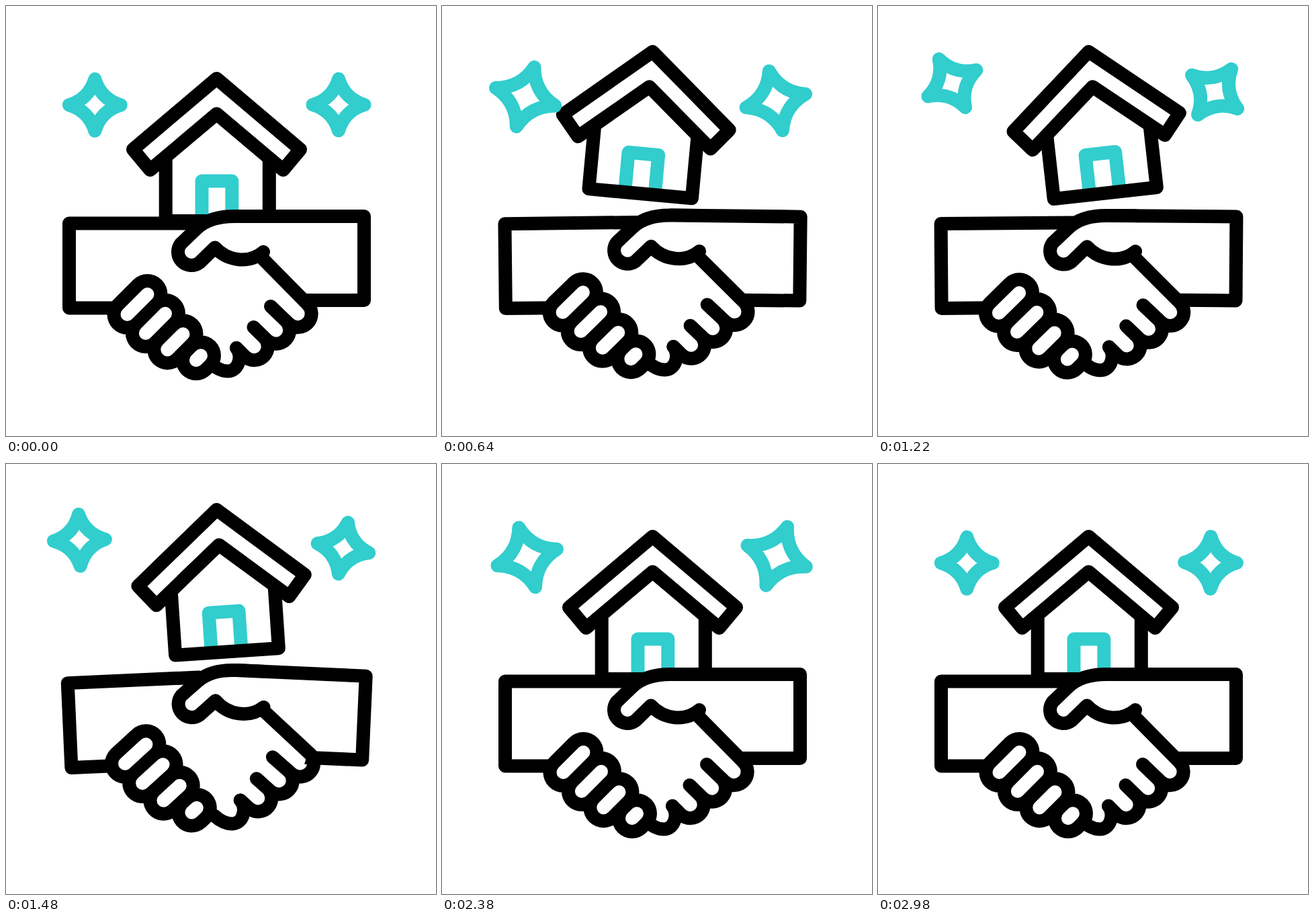
Recreate the animation shown at these times as an HTML page. Size 640x640 px, loop 3.56 s.

```html
<!DOCTYPE html>
<html lang="en">
<head>
<meta charset="utf-8">
<title>Home deal</title>
<style>
  html, body { margin: 0; width: 100%; height: 100%; overflow: hidden; background: #fff; }
  svg { display: block; width: 100%; height: 100%; }
  .ink, .teal { fill: none; stroke: #000; stroke-width: 20; stroke-linecap: round; stroke-linejoin: round; }
  .teal { stroke: #32cdcd; }
  .paper { fill: #fff; }
  .outer { stroke-width: 60; }
  .inner { stroke: #fff; }
</style>
</head>
<body>
<svg viewBox="0 0 640 640">
  <g class="house">
    <path class="paper" d="M238 225L313.5 160L392 225V320H238Z"/>
    <path class="teal" d="M291.5 320V260.5H336.3V320"/>
    <path class="ink" d="M237.7 225V320H391.8V225"/>
    <path class="ink paper" d="M313.5 108L438 213.5L412.5 244L313.5 160.5L214.5 244L189 213.5Z"/>
  </g>

  <g class="right">
    <path class="paper" d="M340 313H533V438H415L383 366Z"/>
    <path class="ink" d="M340 313H533V438H420"/>
  </g>

  <g class="left">
    <path class="paper" d="M94 323.5H290L382 376L447 442L434 478L369 527L330 543L300 535L165 449H94Z"/>
    <path class="ink" d="M290 323.5H94V449.5H172"/>
    <path class="ink knuckles"/>
    <path class="ink" d="M343 509C352 520 347 543.5 330 543.5C320 543.5 312 539 303 530"/>
  </g>

  <g class="right">
    <path class="paper ink thumb" d="M383 313H340C318 313 299 317 284 331L260 354A20 20 0 0 0 288 382L311 359.5C330 380 362 384 383 366"/>
    <path class="ink outer fingers"/>
    <path class="ink inner fingers"/>
  </g>

  <path class="teal star"/>
  <path class="teal star"/>
</svg>
<script>
const LOOP = 3560;
const all = selector => [...document.querySelectorAll(selector)];
const list = (n, make) => Array.from({ length: n }, (_, i) => make(i)).join('');
const set = (selector, name, value) => all(selector).forEach(el => el.setAttribute(name, value));

// Four fingers of the right hand, each shorter than the one before.
set('.fingers', 'd', list(4, i => {
  const length = 30 - 0.85 * i ** 3;
  return `M${210.5 + 26.5 * i} ${429 + 28 * i + 0.8 * i * i}l${-length} ${length}`;
}));

// Edge of the left hand: a round fingertip, then a line up into the palm.
set('.knuckles', 'd', 'M382 376L448 443' + list(3, i => {
  const x = 434 - 32.5 * i, y = 459 + 24.5 * i;
  return `M${x + 14} ${y - 16}A19 19 0 0 1 ${x - 13} ${y + 14}L${394 - 25.5 * i} ${447 + 31 * i}`;
}));

const starPath = r => 'M' + list(4, i => {
  const a = i * Math.PI / 2, c = Math.cos(a), s = Math.sin(a), k = 0.23 * r;
  return `${i ? ' ' : ''}${r * c} ${r * s}Q${k * (c - s)} ${k * (c + s)}`;
}) + ` ${r} 0Z`;

const ease = u => u ** 1.75 / (u ** 1.75 + (1 - u) ** 1.75);
const ramp = (t, from, to) => ease(Math.min(1, Math.max(0, (t - from) / (to - from))));
const there = (t, from, peak, to) => ramp(t, from, peak) - ramp(t, peak, to);

// Alternates between +1 and -1 in equal steps, starting and ending at 0.
function swing(t, start, step, peaks) {
  const u = Math.min(peaks + 1, Math.max(0, (t - start) / step));
  const level = i => i < 1 || i > peaks ? 0 : i % 2 ? 1 : -1;
  const i = Math.floor(u);
  return level(i) + (level(i + 1) - level(i)) * ease(u - i);
}

const stars = [
  { x: 132.3, y: 147.3, dx: -23, dy: -34, lag: 0, turn: 180, times: [80, 1430, 2880] },
  { x: 495, y: 147, dx: 7, dy: -22, lag: 80, turn: -180, times: [100, 1600, 3080] }
];
const starNodes = all('.star');

function draw() {
  const t = performance.now() % LOOP;

  const lift = 40 * (ramp(t, 1490, 1880) - ramp(t, 170, 560));
  const tilt = 5.5 * ramp(t, 170, 590) - 12 * ramp(t, 590, 1150) + 6.5 * ramp(t, 1150, 1890);
  set('.house', 'transform', `translate(0 ${lift}) rotate(${tilt} 313.5 108)`);

  const shake = 4 * swing(t, 190, 292, 4);
  set('.left', 'transform', `rotate(${shake} 152 375)`);
  set('.right', 'transform', `rotate(${-shake} 475 375)`);

  stars.forEach((s, i) => {
    const u = Math.min(1, Math.max(0, (t - s.lag) / 3000));
    const go = there(t, ...s.times);
    const size = 38.5 + 8 * Math.sin(2 * Math.PI * u) ** 2;
    starNodes[i].setAttribute('d', starPath(size));
    starNodes[i].setAttribute('transform',
      `translate(${s.x + s.dx * go} ${s.y + s.dy * go}) rotate(${s.turn * ease(u)})`);
  });
  requestAnimationFrame(draw);
}
draw();
</script>
</body>
</html>
```
